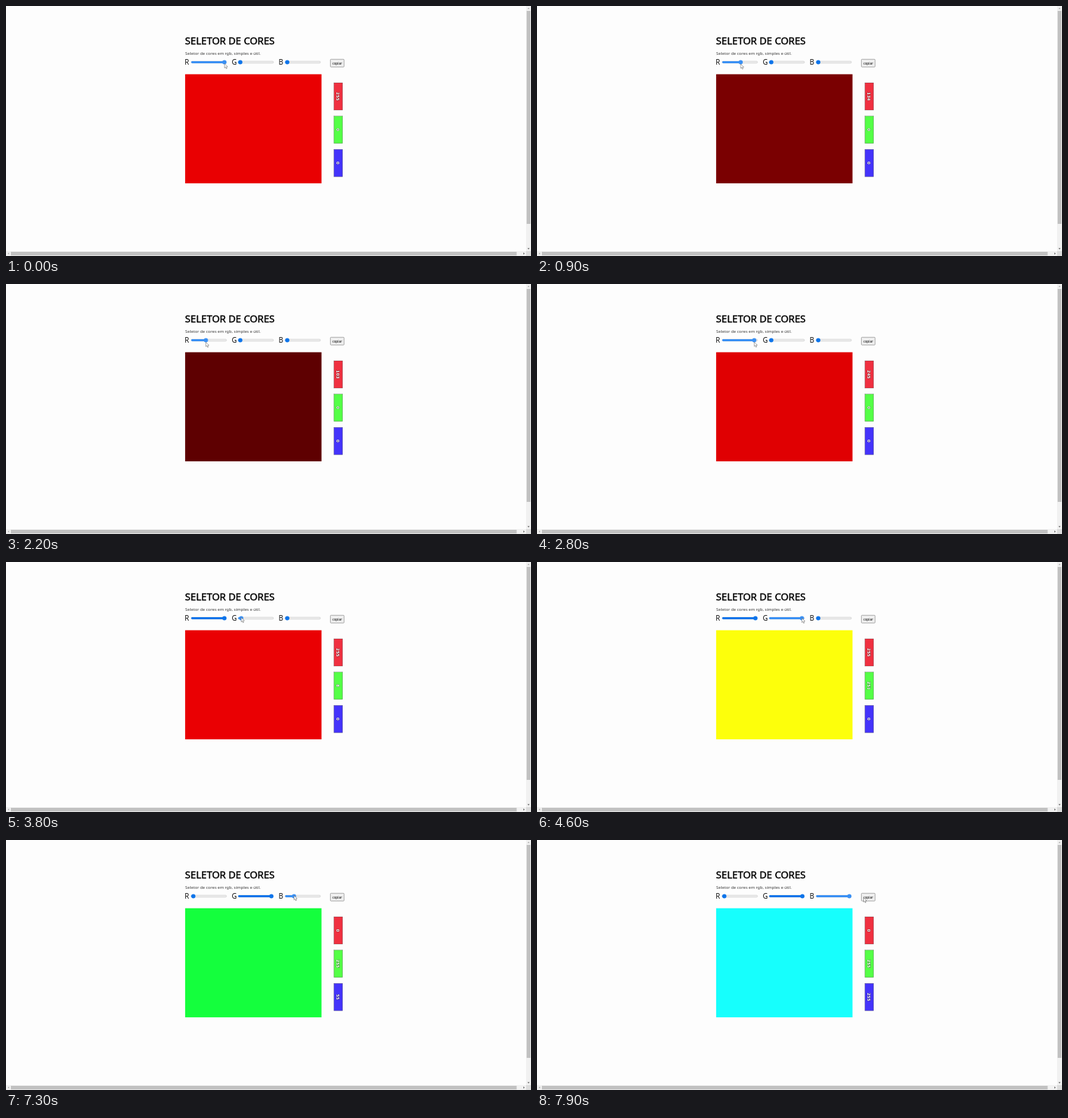
An HTML page that plays this animation: 750 by 358 pixels, repeating every 8000 ms.

```html
<!DOCTYPE html>
<html lang="pt">
<head>
<meta charset="utf-8">
<title>Seletor de cores</title>
<style>
  html, body { margin: 0; width: 100%; height: 100%; overflow: hidden; background: #fdfdfd; }
  svg { display: block; width: 750px; height: 358px; font-family: "Noto Sans", "Open Sans", sans-serif; }
  .title { font-size: 14.15px; stroke: #000; stroke-width: .4px; }
  .sub { font-size: 5.94px; fill: #3c3c3c; }
  .label { font-size: 10px; fill: #111; }
  .copy { font-size: 4.8px; text-anchor: middle; }
  .value { font: 700 5.8px "DejaVu Sans", sans-serif; fill: #fff; text-anchor: middle;
           stroke: #0009; stroke-width: .6px; paint-order: stroke; }
  .bar { stroke: #0007; stroke-width: .5px; }
  .track { fill: #efefef; stroke: #b8b8b8; stroke-width: .5px; }
</style>
</head>
<body>
<svg viewBox="0 0 750 358">
  <text class="title" x="255.8" y="55">SELETOR DE CORES</text>
  <text class="sub" x="256" y="70">Seletor de cores em rgb, simples e útil.</text>
  <rect id="swatch" x="255.9" y="97.7" width="194.8" height="156.2"/>
  <g id="controls"></g>
  <rect x="463.4" y="76.3" width="19.6" height="11" rx="1" fill="#efefef" stroke="#777" stroke-width=".6"/>
  <text class="copy" x="473.2" y="83.5">copiar</text>
  <g id="scrollbars">
    <path d="M743 0h7v358H0v-7h743z" fill="#f1f1f1"/>
    <path d="M743 351h7v7h-7z" fill="#dcdcdc"/>
    <path d="M743.8 7h5.4v305h-5.4zM7 352h722.5v5.3H7z" fill="#c1c1c1"/>
    <path d="M745 4.3h3l-1.5-1.7zM4.3 353v3l-1.7-1.5z" fill="#a3a3a3"/>
    <path d="M745 346.8h3l-1.5 1.7zM739.2 353v3l1.7-1.5z" fill="#505050"/>
  </g>
  <path id="cursor" d="M0 0V6.3L1.4 5L2.4 7.4L3.5 6.9L2.5 4.6H4.5Z"
        fill="#fff" stroke="#555" stroke-width=".5" stroke-linejoin="round"/>
</svg>
<script>
const LOOP = 8000, STEP = 100, TRAVEL = 44.4, KNOB = 3.1;
const $ = id => document.getElementById(id);
const clamp = (v, max) => Math.max(0, Math.min(max, v));
const ease = p => (1 - Math.cos(Math.PI * p)) / 2;

// Pointer moves: start, end, target x, target y.
const home = [312.2, 82.5];
const moves = [
  [300, 1540, 267.5, 83.5],
  [1580, 3000, 312.5, 83],
  [3200, 3600, 335, 79.5],
  [3700, 4700, 379.5, 80.3],
  [4700, 5400, 312.5, 79],
  [5600, 6100, 261.5, 78.3],
  [6100, 6400, 376, 75],
  [6500, 7000, 402, 79],
  [7100, 7900, 466.5, 82.5]
];

// Slider values follow the pointer during each drag.
const channels = [
  { name: 'R', fill: '#f03040', drags: [[0, 3200], [5600, 6100]] },
  { name: 'G', fill: '#54ff46', drags: [[3700, 4700]] },
  { name: 'B', fill: '#4433fb', drags: [[7100, LOOP]] }
];

function pointerAt(t) {
  let [x, y] = home;
  for (const [start, end, toX, toY] of moves) {
    const p = ease(clamp((t - start) / (end - start), 1));
    x += (toX - x) * p;
    y += (toY - y) * p;
  }
  return [x, y];
}

function add(tag, attrs, text) {
  const el = document.createElementNS('http://www.w3.org/2000/svg', tag);
  for (const k in attrs) el.setAttribute(k, attrs[k]);
  if (text) el.textContent = text;
  return $('controls').appendChild(el);
}

// BT.709 video shown through a BT.601 matrix.
function screenColor(r, g, b) {
  const y = .2126 * r + .7152 * g + .0722 * b;
  const cr = (r - y) / 1.5748, cb = (b - y) / 1.8556;
  const out = [y + 1.402 * cr, y - .344 * cb - .714 * cr, y + 1.772 * cb];
  return `rgb(${out.map(v => clamp(Math.round(v), 255))})`;
}

channels.forEach((c, i) => {
  const y = 110 + 47.7 * i;
  c.x = 264.5 + 67.1 * i;
  add('text', { class: 'label', x: c.x - 9.2, y: 84 }, c.name);
  add('rect', { class: 'track', x: c.x + .25, y: 79.1, width: 50.2, height: 2.7, rx: 1.3 });
  c.level = add('rect', { x: c.x, y: 79, height: 2.9, rx: 1.4 });
  c.thumb = add('circle', { cy: 80.4, r: 3 });
  add('rect', { class: 'bar', x: 468.5, y, width: 12.3, height: 39, fill: c.fill });
  c.value = add('text', { class: 'value', transform: `translate(471.8 ${y + 19.4}) rotate(90)` });
});

function updateSlider(c, t) {
  const drag = c.drags.filter(d => d[0] <= t).pop();
  const pos = drag ? clamp(pointerAt(Math.min(t, drag[1]))[0] - c.x - KNOB, TRAVEL) : 0;
  const value = Math.round(pos / TRAVEL * 255);
  const color = drag && t <= drag[1] ? '#3a90f4' : '#0d74ea';
  c.thumb.setAttribute('cx', c.x + KNOB + pos);
  c.level.setAttribute('width', KNOB + pos);
  c.thumb.setAttribute('fill', color);
  c.level.setAttribute('fill', color);
  c.value.textContent = value;
  return value;
}

function draw(now) {
  const t = Math.floor(now % LOOP / STEP) * STEP;
  $('swatch').setAttribute('fill', screenColor(...channels.map(c => updateSlider(c, t))));
  $('cursor').setAttribute('transform', `translate(${pointerAt(t)})`);
}

const start = performance.now();
function tick() {
  draw(performance.now() - start);
  requestAnimationFrame(tick);
}
tick();
</script>
</body>
</html>
```
